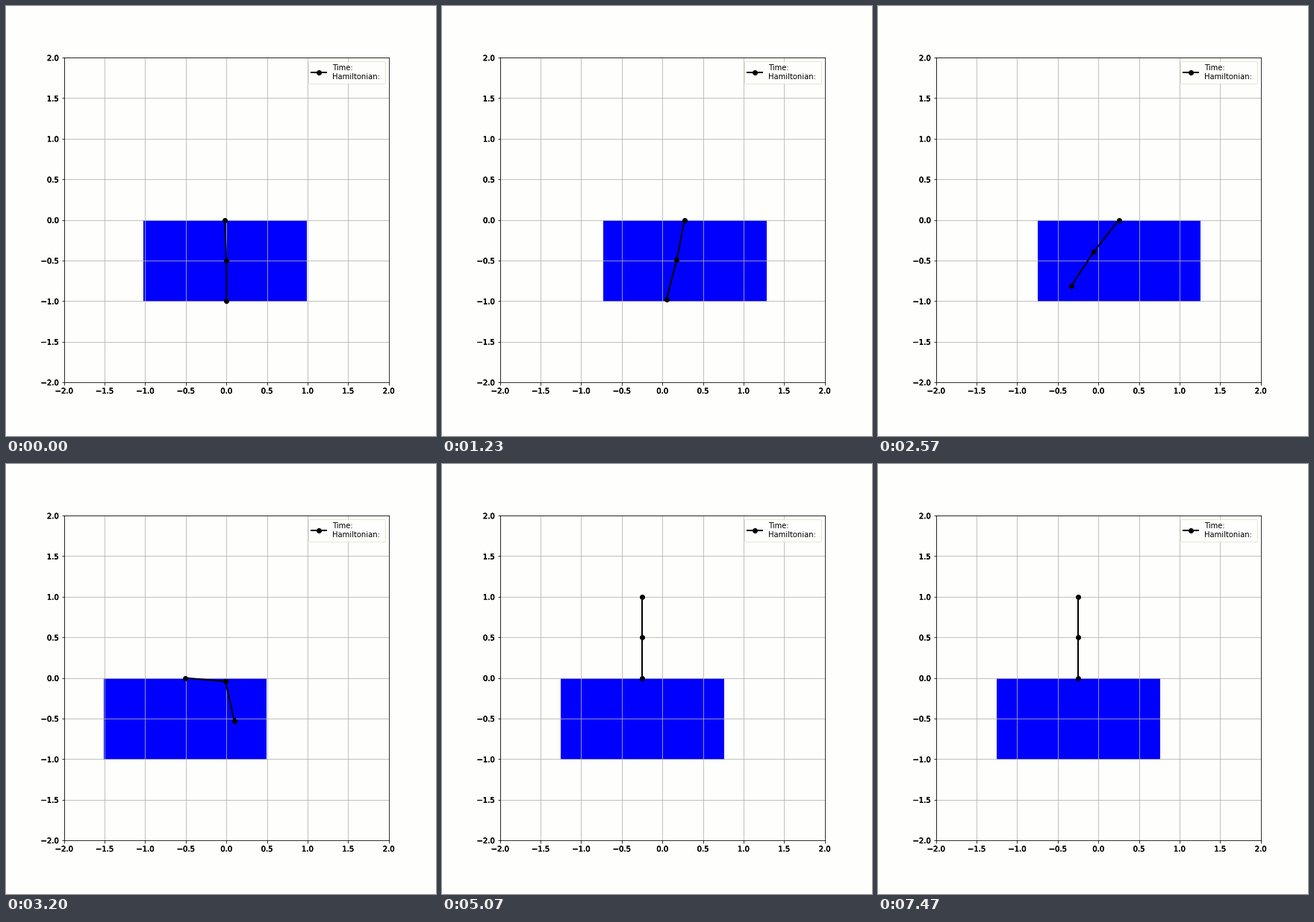
A matplotlib script that plays this animation: 576x576 px, repeating every 8 s.

```python
import math
import numpy as np
import matplotlib.pyplot as plt
from matplotlib import patheffects
from matplotlib.animation import FuncAnimation
from matplotlib.patches import Rectangle

SIZE, DPI = 576, 72
FRAMES, INTERVAL = 250, 32
LINK = 0.5
PAPER = "#fefefc"
UP = math.pi

# Turning points (seconds, value); angles are measured from straight down
CART = [(0, -0.02), (0.72, -0.41), (1.42, 0.41), (2.15, -0.38), (2.62, 0.265),
        (3.3, -0.54), (4.5, -0.2), (5, -0.25)]
INNER = [(0, 0.04), (0.35, 0.3), (0.97, -0.5), (1.65, 0.45), (2.4, -0.8), (3.88, UP)]
OUTER = [(0, 0), (0.35, 0.25), (1, -0.5), (2.05, 1.65), (2.7, -0.8), (4.22, UP)]


def swing(t, turns):
    """Half a cosine wave from each turning point to the next."""
    for (t0, v0), (t1, v1) in zip(turns, turns[1:]):
        if t < t1:
            return v0 + (v1 - v0) * (1 - math.cos(math.pi * (t - t0) / (t1 - t0))) / 2
    return turns[-1][1]


plt.rcParams["font.family"] = "DejaVu Sans"
fig, ax = plt.subplots(figsize=(SIZE / DPI, SIZE / DPI), dpi=DPI, facecolor=PAPER)
fig.subplots_adjust(left=0.125, right=0.9, bottom=0.125, top=0.88)
ticks = np.arange(-2, 2.1, 0.5)
ax.set(xlim=(-2, 2), ylim=(-2, 2), xticks=ticks, yticks=ticks,
       aspect="equal", facecolor=PAPER)
ax.grid(color="#b2b2ac", linewidth=0.8)
for label in ax.get_xticklabels() + ax.get_yticklabels():
    label.set_path_effects([patheffects.withStroke(linewidth=0.5, foreground="black")])

cart = ax.add_patch(Rectangle((-1, -1), 2, 1, color="blue", linewidth=1))
rod, = ax.plot([], [], "o-", color="black", linewidth=2, markersize=6,
               label="Time: \nHamiltonian: ")
ax.legend(loc="upper right", facecolor=PAPER, edgecolor="#e2e2cc")


def update(i):
    t = (i + 0.5) * INTERVAL / 1000
    x, a, b = (swing(t, turns) for turns in (CART, INNER, OUTER))
    cart.set_x(x - 1)
    rod.set_data(x + LINK * np.cumsum([0, math.sin(a), math.sin(b)]),
                 -LINK * np.cumsum([0, math.cos(a), math.cos(b)]))
    return cart, rod


anim = FuncAnimation(fig, update, frames=FRAMES, interval=INTERVAL,
                     repeat=True, repeat_delay=0)
plt.show()
```
